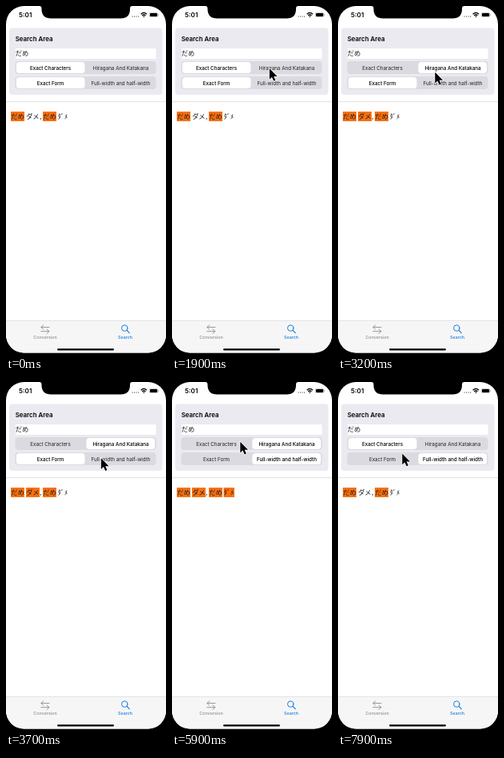
Write an HTML page that moves like this. It is 200 by 435 pixels and loops after 8 s.

```html
<!DOCTYPE html>
<html lang="en">
<head>
<meta charset="utf-8">
<title>Search options</title>
<style>
  html, body { margin: 0; width: 100%; height: 100%; overflow: hidden; background: #000; }
  svg { display: block; width: 100%; height: 100%; }
  text { font-family: Inter, "Noto Sans CJK JP", "Noto Sans CJK", sans-serif; }
  .ja { font: 8.3px "Noto Sans CJK JP", "Noto Sans CJK", sans-serif; fill: #1c1c1c; }
  .label { font-size: 6.25px; font-weight: 400; text-anchor: middle; fill: #222; }
  .label.on { font-weight: 500; fill: #000; }
  .tab { font-size: 5.4px; font-weight: 500; text-anchor: middle; }
  .thumb { fill: #fff; filter: drop-shadow(0 .5px .7px #0003); }
  .mark { fill: #f87010; }
</style>
</head>
<body>
<svg viewBox="0 0 200 435" preserveAspectRatio="none">
  <clipPath id="screen"><rect width="200" height="433.5" rx="22.5"/></clipPath>
  <rect width="200" height="433.5" rx="22.5" fill="#fff"/>
  <path d="M41.5 0Q44.5 0 44.5 3V4.5Q45 15.5 56 15.5H143.5Q154.5 15.5 155 4.5V3Q155 0 158 0Z"/>

  <!-- status bar -->
  <text x="16" y="14" font-size="8.1" font-weight="600">5:01</text>
  <path d="M158 13h8" stroke="#000" stroke-width="1.1" stroke-linecap="round" stroke-dasharray="0 2.5"/>
  <g fill="none" stroke="#000" stroke-width="1.4">
    <path d="M168.6 10.3Q172.3 6.9 176 10.3M170.2 12Q172.3 10.1 174.4 12"/>
    <rect x="179.3" y="8.4" width="10.4" height="5.2" rx="1.6" stroke="#999" stroke-width=".6"/>
  </g>
  <path d="M171.2 13L172.3 14.2 173.4 13Q172.3 12.2 171.2 13Z"/>
  <rect x="180" y="9" width="9" height="4" rx=".9"/>
  <rect x="190.3" y="10.1" width=".8" height="2" rx=".4" fill="#999"/>

  <!-- search card -->
  <rect x="4" y="27.5" width="191.5" height="83.5" rx="4" fill="#ebeaf1"/>
  <text x="11.7" y="43.5" font-size="7.9" font-weight="600">Search Area</text>
  <rect x="12" y="53" width="175.5" height="13" rx="1" fill="#fff"/>
  <text class="ja" x="11.7" y="62.3">だめ</text>
  <g id="controls"></g>
  <path d="M0 119.7h200" stroke="#d3d3d5" stroke-width=".7"/>

  <!-- results -->
  <g id="results"></g>

  <!-- tab bar -->
  <g clip-path="url(#screen)">
    <rect y="393" width="200" height="42" fill="#f6f6f6"/>
    <path d="M0 393.2h200" stroke="#d2d2d4" stroke-width=".6"/>
  </g>
  <g fill="none" stroke-width=".9" stroke-linecap="round" stroke-linejoin="round">
    <path d="M54 401.5H43.8l3-2.7m-3 2.7 3 2.7M43.8 406.7H54l-3-2.7m3 2.7-3 2.7" stroke="#8e8e93"/>
    <path d="M151 405.3l3.2 3.3" stroke="#147ce0" stroke-width="1.2"/>
    <circle cx="148.2" cy="402.6" r="3.7" stroke="#147ce0" stroke-width="1"/>
  </g>
  <text class="tab" x="49" y="415.6" fill="#8e8e93">Conversion</text>
  <text class="tab" x="149" y="415.6" fill="#147ce0">Search</text>
  <rect x="64" y="428.2" width="71" height="2.2" rx="1.1"/>

  <path id="cursor" d="M0 0V13.8L3.1 10.9 5.4 15.8 7.6 14.8 5.4 10H9.8Z"
        stroke="#fff" stroke-width="1.6" stroke-linejoin="round" paint-order="stroke"/>
</svg>
<script>
const LOOP = 8000;
const $ = id => document.getElementById(id);

// Each switch lists the times at which the selected side flips.
const rows = [
  { y: 69, labels: ["Exact Characters", "Hiragana And Katakana"], flips: [2300, 5900] },
  { y: 88, labels: ["Exact Form", "Full-width and half-width"], flips: [4200] }
];

const words = [
  { text: "だめ", x: 6, width: 17, shown: () => true },
  { text: "ダメ", x: 25, width: 17, shown: kana => kana },
  { text: "だめ", x: 46, width: 17, shown: () => true },
  { text: "ﾀﾞﾒ", x: 64.5, width: 13.5, shown: (kana, wide) => kana && wide }
];

// Pointer stops: time, x, y
const path = [
  [800, 215, 400], [900, 185, 330], [1000, 120, 170], [1100, 62, 90],
  [1200, 49, 73], [1300, 75, 77], [1400, 94, 78], [1500, 94, 78],
  [1900, 121.8, 78], [2100, 123.8, 76.5], [3000, 123.8, 76.5], [3400, 118.8, 89],
  [3700, 118.8, 95.2], [3900, 125.8, 95.2], [5300, 125.8, 95.2], [5700, 85.3, 74.7],
  [7899, 85.3, 74.7], [7900, 80.3, 89.5], [LOOP, 80.3, 89.5]
];

$("controls").innerHTML = rows.map(({ y, labels }) => `
  <rect x="11.5" y="${y}" width="176" height="16" rx="4" fill="#dbdae0"/>
  <rect class="thumb" x="12.7" y="${y + 1}" width="86" height="14" rx="3.5"/>
  ${labels.map((s, i) =>
    `<text class="label" x="${55.5 + 88 * i}" y="${y + 10.6}">${s}</text>`).join("")}`).join("");

$("results").innerHTML = words.map(({ text, x, width }) => `
  <rect class="mark" x="${x}" y="132" width="${width}" height="12"/>
  <text class="ja" x="${x + .2}" y="141">${text}</text>`).join("") +
  '<text class="ja" x="42" y="141">,</text>';

const thumbs = document.querySelectorAll(".thumb");
const labels = document.querySelectorAll(".label");
const marks = document.querySelectorAll(".mark");

const spring = ms => {
  const k = Math.max(0, ms) * .0205;
  return 1 - (1 + k) * Math.exp(-k);
};

function pointerAt(t) {
  const i = path.findIndex(p => p[0] > t);
  const [t0, x0, y0] = path[i - 1], [t1, x1, y1] = path[i];
  const u = (t - t0) / (t1 - t0);
  return [x0 + (x1 - x0) * u, y0 + (y1 - y0) * u];
}

function draw(t) {
  const selected = rows.map(({ flips }, r) => {
    const slide = flips.reduce((sum, f, i) => sum + (i % 2 ? -1 : 1) * spring(t - f), 0);
    thumbs[r].setAttribute("x", 12.7 + 87.5 * slide);
    const side = flips.filter(f => t >= f + 100).length % 2;
    [0, 1].forEach(i => labels[2 * r + i].classList.toggle("on", i === side));
    return side === 1;
  });
  words.forEach((w, i) => { marks[i].style.opacity = w.shown(...selected) ? 1 : 0; });

  const visible = t >= path[0][0];
  $("cursor").style.display = visible ? "" : "none";
  if (visible) $("cursor").setAttribute("transform", `translate(${pointerAt(t)})`);
}

function tick() {
  draw(performance.now() % LOOP);
  requestAnimationFrame(tick);
}
tick();
</script>
</body>
</html>
```
